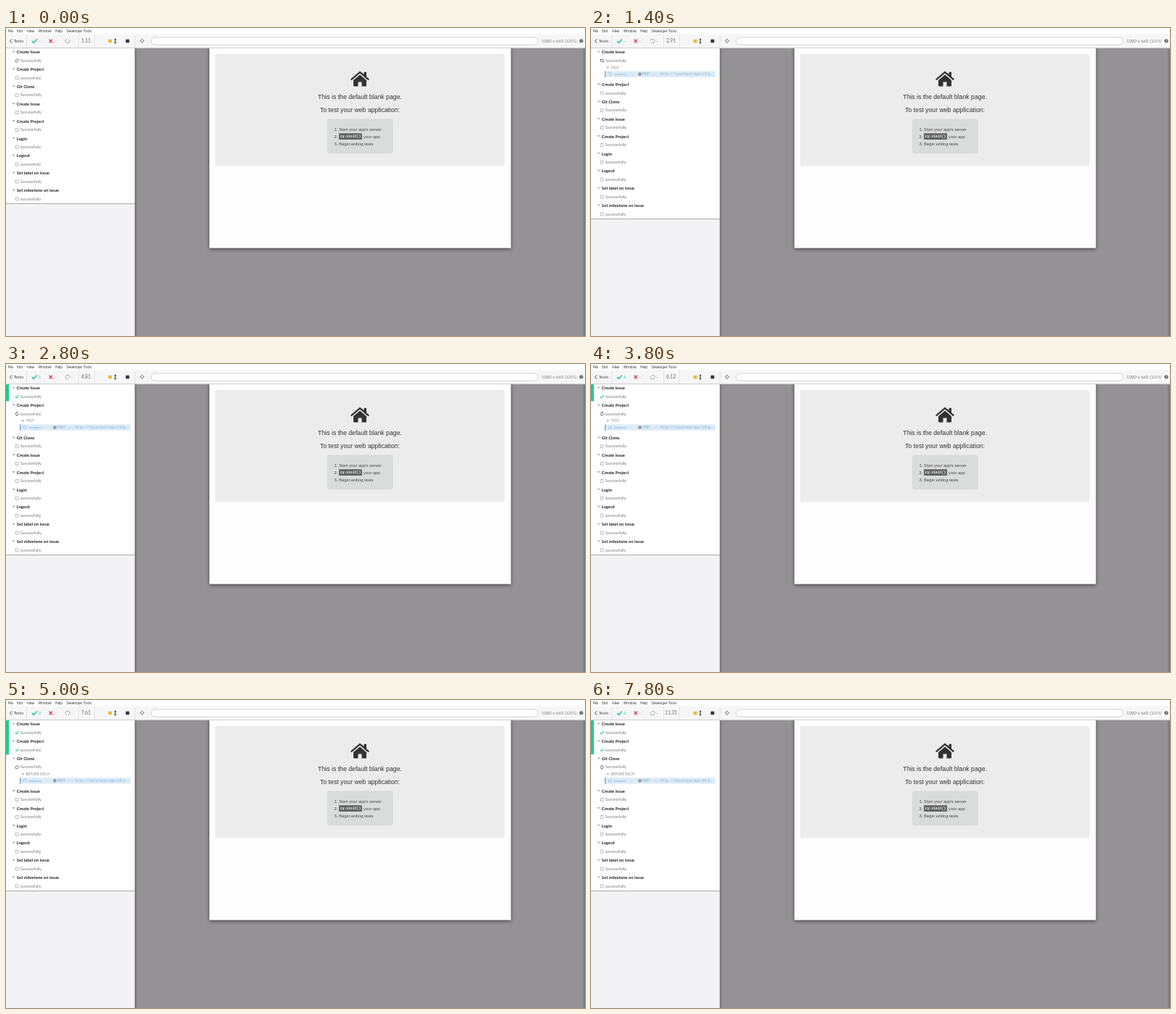
Animation, 800 px wide and 425 px high, one loop 8000 ms. Source, as an HTML page:

```html
<!DOCTYPE html>
<html lang="en">
<head>
<meta charset="utf-8">
<title>Test runner</title>
<style>
  html, body { margin: 0; width: 100%; height: 100%; overflow: hidden; background: #949294; }
  svg { display: block; width: 100%; height: 100%; font-family: Lato, sans-serif; }
  text { white-space: pre; }
  .menu { font: 4.7px "Open Sans", sans-serif; fill: #222; }
  .page { font-family: "Liberation Sans", Arial, sans-serif; fill: #333; }
  .lead { font-size: 8.73px; text-anchor: middle; }
  .list { font-size: 5.85px; fill: #444; }
  .mono { font-family: "Liberation Mono", monospace; }
  .suite { font-size: 5.9px; font-weight: 700; fill: #222; }
  .test { font-size: 5.5px; fill: #777; }
  .hook { font-size: 4.85px; fill: #8a8a8a; }
  .line { fill: none; }
</style>
</head>
<body>
<svg viewBox="0 0 800 425">
  <defs>
    <filter id="shadow" x="-10%" y="-10%" width="120%" height="120%">
      <feDropShadow dx="0" dy="1.5" stdDeviation="2.5" flood-color="#000" flood-opacity=".55"/>
    </filter>
    <linearGradient id="edge">
      <stop offset="0" stop-color="#000" stop-opacity=".22"/>
      <stop offset="1" stop-color="#000" stop-opacity="0"/>
    </linearGradient>
  </defs>

  <rect width="800" height="425" fill="#949294"/>
  <rect x="178" y="28" width="4" height="397" fill="url(#edge)"/>
  <rect x="796" y="28" width="4" height="397" fill="url(#edge)" transform="matrix(-1 0 0 1 1596 0)"/>

  <g class="page">
    <rect x="281" y="20" width="416.5" height="283.5" fill="#fdfdfe" filter="url(#shadow)"/>
    <rect x="289" y="36" width="400" height="154.5" rx="3" fill="#ececed"/>
    <path d="M489 59.5L476 70.5l1.5 1.7L489 62.5l11.5 9.7 1.5-1.7-4-3.5v-6.3h-3.5v3.4z"/>
    <path d="M480 72l9-7.5 9 7.5v7.5q0 1-1 1h-5.5v-6h-5v6H481q-1 0-1-1z"/>
    <text class="lead" x="489" y="97.7">This is the default blank page.</text>
    <text class="lead" x="489" y="116.2">To test your web application:</text>
    <rect x="443.5" y="125.5" width="91.5" height="48" rx="4" fill="#dadbdb"/>
    <g class="list">
      <text x="453.5" y="141.5">1.</text><text x="460" y="141.5">Start your app's server</text>
      <text x="453.5" y="151.5">2.</text><text x="494" y="151.5">your app</text>
      <text x="453.5" y="161.5">3.</text><text x="460" y="161.5">Begin writing tests</text>
    </g>
    <rect x="460" y="145.2" width="32" height="8.8" rx="1" fill="#626262"/>
    <text class="mono" x="461.8" y="151.2" font-size="4.75" font-weight="700" fill="#fff">cy.visit()</text>
  </g>

  <rect y="28" width="178" height="397" fill="#f3f3f5"/>
  <g id="sidebar"></g>
  <path d="M178.3 9V425" stroke="#777" stroke-width=".7"/>

  <rect width="800" height="9" fill="#fff"/>
  <g class="menu">
    <text x="2.5" y="6">File</text><text x="15" y="6">Edit</text><text x="29" y="6">View</text>
    <text x="45" y="6">Window</text><text x="68" y="6">Help</text><text x="83.5" y="6">Developer Tools</text>
  </g>
  <rect y="8.5" width="800" height="19.2" fill="#f6f6f7"/>
  <path d="M0 27.6H800" stroke="#c9c9cb" stroke-width=".7"/>
  <path d="M28.5 9V27.5M100.5 9V27.5M122.5 9V27.5M178.3 9V27.5" stroke="#dcdcde" stroke-width=".7"/>
  <path class="line" d="M8 15.3L5.5 18 8 20.7" stroke="#444" stroke-width="1"/>
  <text x="10.5" y="20.2" font-size="6.1" fill="#444">Tests</text>
  <path class="line" d="M36 18l2.3 2.4 4.4-5" stroke="#10bd94" stroke-width="1.4"/>
  <path class="line" d="M59.6 15.6l4.4 4.8m0-4.8l-4.4 4.8" stroke="#dc3434" stroke-width="1.4"/>
  <g font-size="6">
    <text id="passed" x="45" y="20.2"></text>
    <text x="65.8" y="20.2" fill="#d78a8a">--</text>
    <text x="89.8" y="20.2" fill="#aaa">--</text>
  </g>
  <g id="pending"></g>
  <text id="clock" x="110.5" y="20.2" font-size="6.6" text-anchor="middle" fill="#666"></text>
  <rect x="141.5" y="15.8" width="4.8" height="4.5" rx=".5" fill="#f4b52b"/>
  <path d="M151 14.3l1.7 2h-1.2v3.4h1.2l-1.7 2-1.7-2h1.2v-3.4h-1.2z" fill="#333"/>
  <rect x="165.5" y="15.7" width="4.8" height="4.6" fill="#333"/>
  <circle class="line" cx="188" cy="17.8" r="2" stroke="#777" stroke-width=".8"/>
  <path d="M188 14.7v1.7m0 2.8v1.7M184.9 17.8h1.7m2.8 0h1.7" stroke="#777" stroke-width=".8"/>
  <rect x="200.3" y="13" width="535" height="10" rx="5" fill="#fff" stroke="#c8c8ca" stroke-width=".8"/>
  <text x="740" y="19.8" font-size="5.9" fill="#777">1000 x 660</text>
  <text x="772" y="19.8" font-size="5.3" fill="#888">(100%)</text>
  <circle cx="794.9" cy="17.8" r="2.6" fill="#666"/>
  <path d="M794.9 16v.7m0 .6v2.2" stroke="#fff" stroke-width=".7"/>
</svg>

<script>
const LOOP = 8000, TICK = 200, PITCH = 23.85, GREEN = '#1fcb8b';
const $ = id => document.getElementById(id);

const tests = [
  ['Create Issue', 'Successfully', 'TEST'],
  ['Create Project', 'successfully', 'TEST'],
  ['Git Clone', 'Successfully', 'BEFORE EACH'],
  ['Create Issue', 'Successfully'],
  ['Create Project', 'Successfully'],
  ['Login', 'successfully'],
  ['Logout', 'successfully'],
  ['Set label on issue', 'Successfully'],
  ['Set milestone on issue', 'successfully'],
];

// time, running test, visible requests
const steps = [
  [0, 0, 0], [600, 0, 1], [1800, 0, 2],
  [2000, 1, 0], [2800, 1, 1],
  [4000, 2, 0], [5000, 2, 1],
];

// time, elapsed seconds
const clock = [
  [0, 1.11], [1400, 2.91], [2000, 3.72], [2800, 4.81],
  [4200, 6.64], [5000, 7.61], [7800, 11.31],
];

const text = (cls, x, y, s) => `<text class="${cls}" x="${x}" y="${y}">${s}</text>`;
const caret = (x, y) => `<path d="M${x} ${y}h4l-2 2.4z" fill="#a5a5a5"/>`;

const notch = (x, y, r, angle, color) =>
  `<circle class="line" cx="${x}" cy="${y}" r="${r}" stroke="${color}" stroke-width=".8"
    pathLength="100" stroke-dasharray="86 14" transform="rotate(${angle - 65} ${x} ${y})"/>`;

const refresh = (x, y, angle) =>
  `<g transform="translate(${x} ${y}) rotate(${angle})">
    <path class="line" d="M-2-.4A2 2 0 0 1 1.7-1.1M2 .4A2 2 0 0 1-1.7 1.1" stroke="#555" stroke-width=".8"/>
    <path d="M2.4-2.3V-.4H.5zM-2.4 2.3V.4H-.5z" fill="#555"/></g>`;

const tick = (x, y) =>
  `<path class="line" d="M${x - 2.3} ${y}l1.7 1.7 3-3.5" stroke="${GREEN}" stroke-width="1.1"/>`;

const box = (x, y) =>
  `<rect class="line" x="${x - 2}" y="${y - 2}" width="4" height="4" rx=".4" stroke="#999" stroke-width=".7"/>`;

function requestRow(y, angle) {
  return `<rect x="19" y="${y - 4.2}" width="153" height="8.4" fill="#deebf7"/>
    <rect x="19" y="${y - 4.2}" width="1.2" height="8.4" fill="#5f9fd6"/>
    ${notch(26, y, 2.1, angle, '#8ab8de')}
    <circle cx="67.5" cy="${y}" r="2.4" fill="#9b9b9b"/>
    <g class="mono" fill="#74a9d8">
      <text x="32" y="${y + 1.5}" font-size="4.3">REQUEST</text>
      <text x="71" y="${y + 1.5}" font-size="4.6">POST --- http://localhost/api/v4/p…</text>
    </g>`;
}

function sidebar(running, requests, angle) {
  const extra = requests ? 12 + 9 * requests : 0;
  const bottom = 242.5 + extra;
  let out = `<rect y="28" width="178" height="${bottom - 28}" fill="#fff"/>
    <path d="M0 ${bottom}H178" stroke="#aaa" stroke-width="1"/>
    <rect y="28" width="4" height="${running && running * PITCH - 0.5}" fill="${GREEN}"/>`;
  tests.forEach(([suite, test, hook], i) => {
    const y = 33.3 + i * PITCH + (i > running ? extra : 0);
    const icon = i < running ? tick : i === running ? refresh : box;
    out += caret(8.6, y - 1.6) + text('suite', 14.8, y + 2, suite)
      + icon(15.1, y + 11.7, angle) + text('test', 19.7, y + 13.4, test);
    if (i !== running || !requests) return;
    out += caret(21.2, y + 20.2) + text('hook', 27.6, y + 23.2, hook);
    for (let n = 0; n < requests; n++) out += requestRow(y + 30.4 + 9 * n, angle);
  });
  return out;
}

function elapsed(t) {
  const i = Math.max(1, clock.findIndex(([time]) => time >= t));
  const [t0, a] = clock[i - 1], [t1, b] = clock[i];
  return a + (b - a) * (t - t0) / (t1 - t0);
}

let shown = -1;
function draw(now) {
  const frame = Math.floor(now % LOOP / TICK);
  if (frame !== shown) {
    shown = frame;
    const t = frame * TICK, angle = frame * 36;
    const [, running, requests] = steps.filter(([time]) => time <= t).pop();
    $('sidebar').innerHTML = sidebar(running, requests, angle);
    $('pending').innerHTML = notch(85, 18, 2.9, angle, '#999');
    $('passed').textContent = running || '--';
    $('passed').setAttribute('fill', running ? GREEN : '#8fb5aa');
    $('clock').textContent = elapsed(t).toFixed(2);
  }
}

const start = performance.now();
function loop() {
  draw(performance.now() - start);
  requestAnimationFrame(loop);
}
loop();
</script>
</body>
</html>
```
